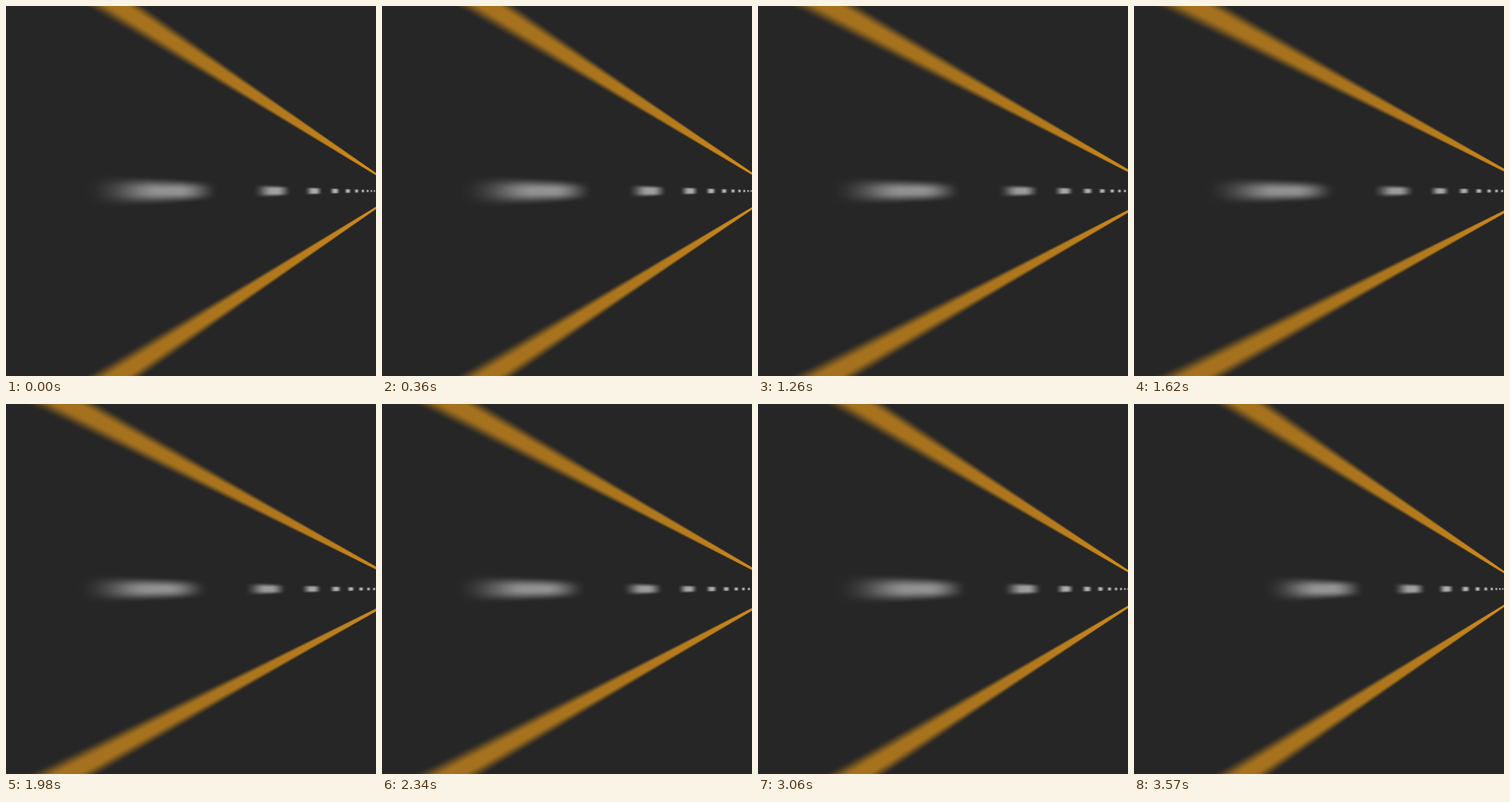
An HTML page with a canvas for the animation above (3600 ms loop, 400x400 px).

```html
<!DOCTYPE html>
<html lang="en">
<head>
<meta charset="utf-8">
<title>Night road</title>
<style>
  html, body { margin: 0; width: 100%; height: 100%; overflow: hidden; background: #262626; }
  canvas { display: block; width: 400px; height: 400px; }
</style>
</head>
<body>
<canvas id="road" width="400" height="400"></canvas>
<script>
const SIZE = 400, MID = 200;
const LOOP = 3600, STEP = 30, DASH_TIME = 180;
const GAP = 0.00506;          // distance between dashes, in inverse road width
const GROUND = [38, 38, 38];
const AMBER = [235, 155, 25];
const WHITE = [238, 238, 238];

const ctx = document.getElementById('road').getContext('2d');
const image = ctx.createImageData(SIZE, SIZE);
const px = image.data;

function smooth(t) {
  t = Math.min(1, Math.max(0, t));
  return t * t * (3 - 2 * t);
}

// A bar of half width h whose edges are blurred over +-b
function softBar(x, h, b) {
  return smooth((x + h + b) / (2 * b)) - smooth((x - h + b) / (2 * b));
}

function put(x, y, color, a) {
  const i = (y * SIZE + x) * 4;
  for (let c = 0; c < 3; c++) px[i + c] = GROUND[c] + (color[c] - GROUND[c]) * a;
  px[i + 3] = 255;
}

function draw(time) {
  const tilt = Math.cos(2 * Math.PI * time / LOOP);
  const horizon = 435.5 - 7.5 * tilt;
  const slope = MID / (horizon - (93 + 28 * tilt));
  const phase = 0.01149 - 0.00034 * tilt - GAP * (time % DASH_TIME) / DASH_TIME;

  for (let x = 0; x < SIZE; x++) {
    const near = horizon - x - 0.5;
    const reach = slope * near;           // height of the side line above the axis
    const blur = Math.min(1, near / 250);
    const glow = Math.exp(-near / 80);
    const edge = 0.04 * blur + 0.6 / reach;

    const depth = 1 / reach;
    const turn = (depth - phase) / GAP;
    const along = (turn - Math.round(turn)) * GAP;
    const dash = softBar(along, 0.00095, 0.0007 + 0.5 * depth / near) * (0.52 + 0.48 * glow);
    const line = 0.64 + 0.36 * glow;

    for (let y = 0; y < MID; y++) {
      const v = (MID - y - 0.5) / reach;
      const side = v > 0.5;
      const a = side
        ? softBar(v - 1, 0.068, edge) * line
        : softBar(v, 0.05, edge) * dash;
      const color = side ? AMBER : WHITE;
      put(x, y, color, a);
      put(x, SIZE - 1 - y, color, a);
    }
  }
  ctx.putImageData(image, 0, 0);
}

let last = -1;
function tick() {
  const time = Math.floor(performance.now() % LOOP / STEP) * STEP;
  if (time !== last) draw(last = time);
  requestAnimationFrame(tick);
}
tick();
</script>
</body>
</html>
```
